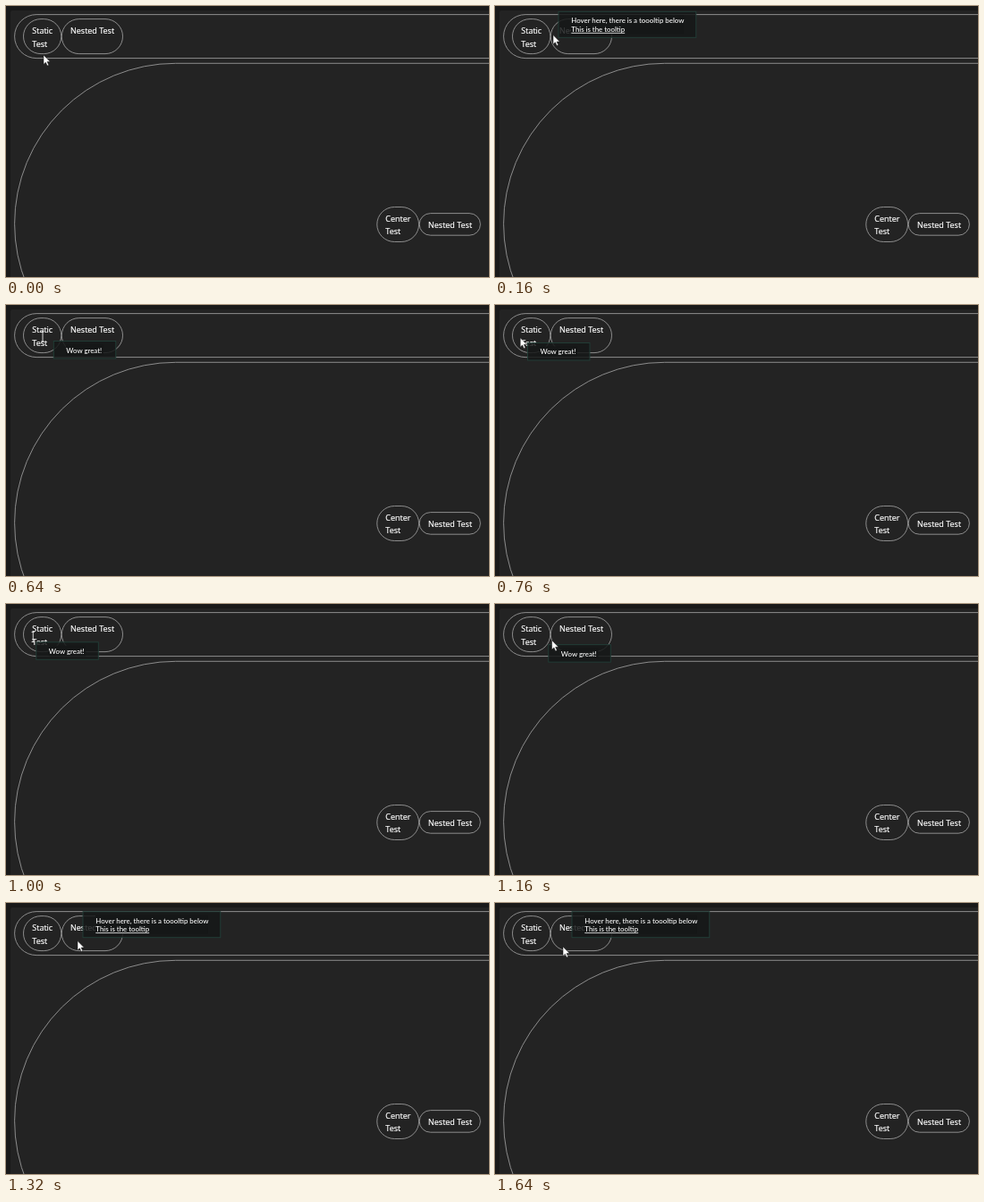
Recreate the animation shown at these times as an HTML page. Size 540 by 304 pixels, loop 1680 ms.

```html
<!DOCTYPE html>
<html lang="en">
<head>
<meta charset="utf-8">
<title>Tooltip demo</title>
<style>
  html, body { margin: 0; width: 100%; height: 100%; overflow: hidden; background: #191919; }
  svg { display: block; width: 100vw; height: 100vh; }
  .outline rect { fill: none; stroke: #929292; stroke-width: .95; }
  .label { font: 9px "Open Sans", "Noto Sans", sans-serif; fill: #fff; stroke: #fff; stroke-width: .2; }
  .tip text { font: 500 7.85px Lato, sans-serif; fill: #fff; }
  .tip .frame { fill: #151717; fill-opacity: .84; stroke: #223f38; stroke-width: .9; }
  .tip .content { fill: #151717; }
  .underlined { text-decoration: underline; }
</style>
</head>
<body>
<svg viewBox="0 0 540 304">
  <rect width="540" height="304" fill="#191919"/>
  <rect x="5" y="5" width="560" height="320" rx="2" fill="#232323"/>
  <g class="outline">
    <rect x="9.6" y="9.6" width="900" height="49" rx="24.5"/>
    <rect x="9.6" y="64.3" width="900" height="360" rx="180"/>
    <rect x="19.5" y="14.6" width="42.3" height="39" rx="19.5"/>
    <rect x="62.3" y="14.6" width="68.2" height="39" rx="19.5"/>
    <rect x="414.8" y="225.5" width="46.8" height="39" rx="19.5"/>
    <rect x="462.2" y="232.6" width="68.2" height="24.6" rx="12.3"/>
  </g>
  <g class="label">
    <text x="29.3" y="31.3">Static</text>
    <text x="29.3" y="45.6">Test</text>
    <text x="72" y="31.3">Nested Test</text>
    <text x="424.3" y="242">Center</text>
    <text x="424.3" y="256.3">Test</text>
    <text x="472" y="249">Nested Test</text>
  </g>
  <g class="tip" id="staticTip">
    <rect class="frame" width="69.5" height="19.5"/>
    <rect class="content" x="14" y="4" width="41.5" height="11.5"/>
    <text x="14" y="13">Wow great!</text>
  </g>
  <g class="tip" id="nestedTip">
    <rect class="frame" width="153.8" height="29"/>
    <rect class="content" x="14" y="4" width="125.8" height="21"/>
    <text x="14.3" y="13">Hover here, there is a toooltip below</text>
    <text x="14.3" y="22.6" class="underlined">This is the tooltip</text>
  </g>
  <path id="arrow" d="M0 0V10.4L2.4 8.2L4.1 12L5.8 11.2L4.1 7.6H7.4Z"
        fill="#fff" stroke="#111" stroke-width=".5"/>
  <path id="beam" d="M-1.6-5.5H1.6M0-5.5V5.5M-1.6 5.5H1.6" fill="none" stroke="#eee" stroke-width=".9"/>
</svg>
<script>
const LOOP = 1680, STEP = 40;

// The pointer eases from its home through four stops
const home = { x: 42, y: 55 };
const moves = [
  { from: 0, to: 120, x: 65, y: 32.5 },
  { from: 436, to: 776, x: 28, y: 36.8 },
  { from: 960, to: 1280, x: 80, y: 42.5 },
  { from: 1600, to: 1640, x: 76, y: 49 }
];
const [staticTip, nestedTip, arrow, beam] =
  ['staticTip', 'nestedTip', 'arrow', 'beam'].map(id => document.getElementById(id));

const smooth = k => k * k * (3 - 2 * k);
const clamp = k => Math.min(1, Math.max(0, k));

function pointerAt(t) {
  let { x, y } = home;
  for (const move of moves) {
    const k = smooth(clamp((t - move.from) / (move.to - move.from)));
    x += (move.x - x) * k;
    y += (move.y - y) * k;
  }
  return { x, y };
}

function place(node, visible, x, y) {
  node.style.display = visible ? '' : 'none';
  node.setAttribute('transform', `translate(${x} ${y})`);
}

function render(time) {
  const t = Math.floor((time % LOOP) / STEP) * STEP;
  const { x, y } = pointerAt(t);
  const overText = x > 29 && x < 53 && y > 21 && y < 48;
  place(arrow, !overText, x, y);
  place(beam, overText, x, y);

  // Tooltips trail the pointer by one step
  const tail = pointerAt(t - STEP);
  const inside = tail.y < 54, nested = tail.x > 61.8;
  place(staticTip, inside && !nested, tail.x + 5.8, tail.y + 6);
  place(nestedTip, inside && nested, tail.x + 6, Math.max(6.3, tail.y - 32.8));
}

const start = performance.now();
function tick() {
  render(performance.now() - start);
  requestAnimationFrame(tick);
}
tick();
</script>
</body>
</html>
```
